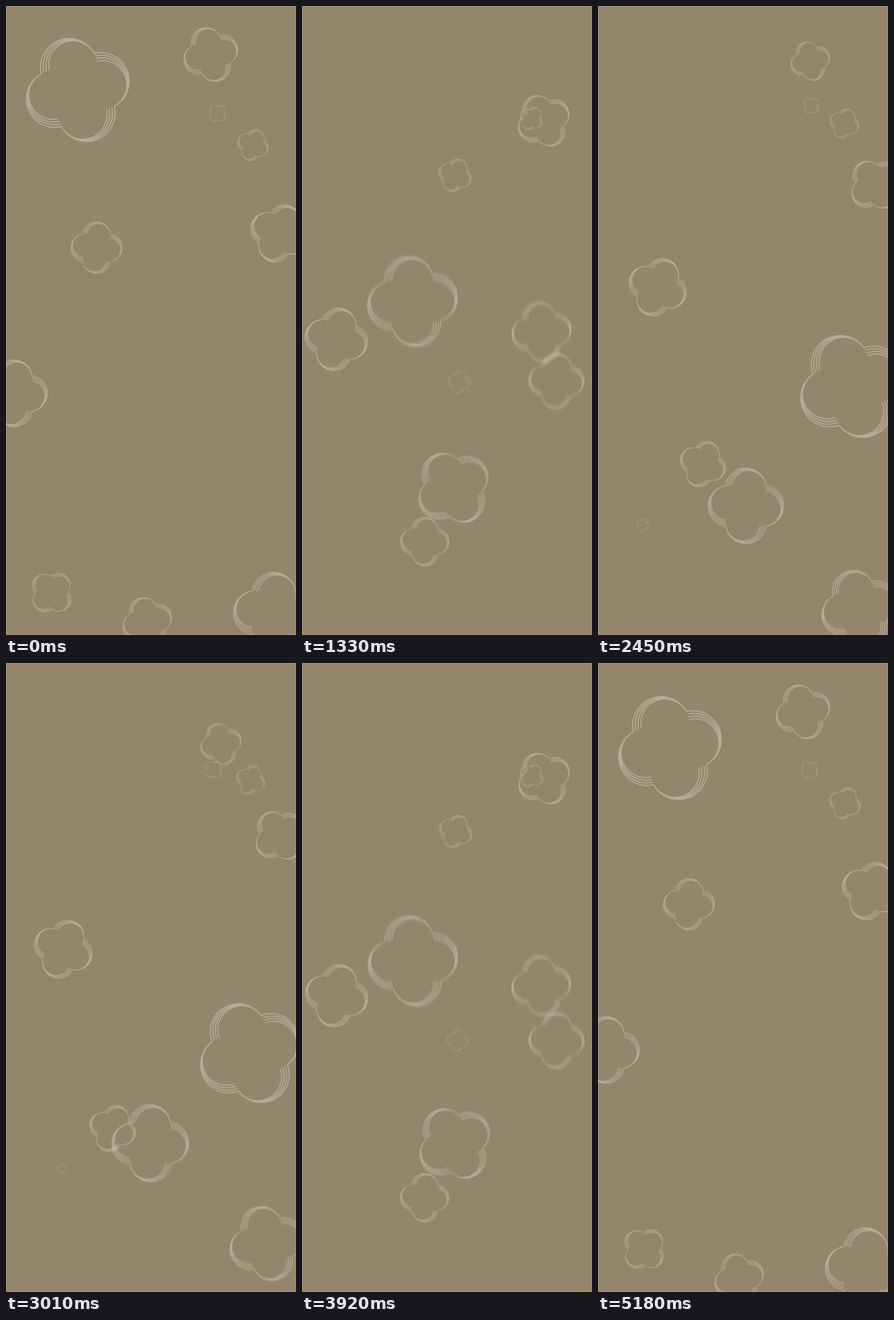
An HTML page with a canvas that plays this animation: 509x1101 px, repeating every 5250 ms.

```html
<!DOCTYPE html>
<html lang="en">
<head>
<meta charset="utf-8">
<title>Drifting flowers</title>
<style>
  html, body { margin: 0; height: 100%; overflow: hidden; background: #94866c; }
  canvas { display: block; }
</style>
</head>
<body>
<canvas id="stage" width="509" height="1101"></canvas>
<script>
const ctx = document.getElementById('stage').getContext('2d');
const LOOP = 5250, STEP = 70, TRAVEL = 2660;
const SHUTTER = 16, SAMPLES = 4;
const LINE = 0.019;

const pose = (x, y, r) => ({ x, y, r });
const mix = (a, b, p) => a + (b - a) * p;

// Start angles cycle in even steps; flowers on the left turn clockwise,
// those on the right anticlockwise, and the first three turn twice as far.
const flowers = [];
function drift(from, to) {
  const i = flowers.length, step = 21;
  const side = from.x < 256 ? 1 : -1;
  from.angle = step * (i % 4 - 1);
  to.angle = from.angle + side * step * (i < 3 ? 2 : 1);
  flowers.push({ from, to });
}

// A radius may pass through zero, which turns the flower inside out.
drift(pose(248, 1078, 43), pose(183, 797, 40));
drift(pose(159, 423, 44), pose(378, 170, 14));
drift(pose(433.5, 243.5, 27.5), pose(459.5, 1069, 67));
drift(pose(371, 188, 15.5), pose(433.5, 206, 26));
drift(pose(126, 147, 90.5), pose(262, 888, 64));
drift(pose(470, 1062, 69), pose(371, 79, 33.5));
drift(pose(480, 398, 50.5), pose(71, 918, -12));
drift(pose(80, 1027, 37.5), pose(451.5, 659.5, 92.5));
drift(pose(359.5, 85, 47.5), pose(489, 317, 45.5));
drift(pose(14, 678, 57), pose(106.5, 489, 50.5));

// Four lobes, each a fan of four arcs that meet at one corner.
function makeFlower() {
  const corner = 0.548, centre = 0.4725, radius = 0.554, tilt = 0.137;
  const lobe = new Path2D();
  for (let k = 0; k < 4; k++) {
    const s = 1 - 0.05 * k;
    const arc = new Path2D();
    arc.arc(corner * (1 - s), -corner + (corner - centre) * s, radius * s,
      Math.PI + tilt, 2 * Math.PI - tilt);
    lobe.addPath(arc);
  }
  const flower = new Path2D();
  for (let q = 0; q < 4; q++) flower.addPath(lobe, new DOMMatrix().rotate(90 * q));
  return flower;
}
const shape = makeFlower();

function progress(t) {
  const u = Math.abs(Math.min(t, LOOP + 10 - t)) / TRAVEL;
  return u * u * (3 - 2 * u);
}

function drawFlower({ from, to }, p) {
  const r = mix(from.r, to.r, p), size = Math.abs(r);
  if (size < 0.5) return;
  // Lines thinner than a pixel keep a pixel's width and fade instead.
  const width = LINE * size;
  const strength = Math.min(1, Math.max(0.3, width)) / SAMPLES;
  ctx.save();
  ctx.translate(mix(from.x, to.x, p), mix(from.y, to.y, p));
  ctx.rotate(mix(from.angle, to.angle, p) * Math.PI / 180);
  ctx.scale(r, r);
  ctx.lineWidth = Math.max(width, 1.02) / size;
  ctx.strokeStyle = `rgba(36, 36, 42, ${strength})`;
  ctx.stroke(shape);
  ctx.restore();
}

function render(now) {
  const t = Math.floor((now % LOOP) / STEP) * STEP;
  ctx.globalCompositeOperation = 'source-over';
  ctx.fillStyle = '#94866c';
  ctx.fillRect(0, 0, 509, 1101);
  ctx.strokeStyle = 'rgba(255, 255, 255, .15)';
  ctx.lineWidth = 1;
  ctx.strokeRect(0.5, 0.5, 508, 1100);

  // Motion blur: add up faint exposures across the shutter time.
  ctx.globalCompositeOperation = 'lighter';
  for (let i = 0; i < SAMPLES; i++) {
    const p = progress(t + ((i + 0.5) / SAMPLES - 0.5) * SHUTTER);
    for (const flower of flowers) drawFlower(flower, p);
  }
}

let start;
function tick(now) {
  start ??= now;
  render(now - start);
  requestAnimationFrame(tick);
}
render(0);
requestAnimationFrame(tick);
</script>
</body>
</html>
```
